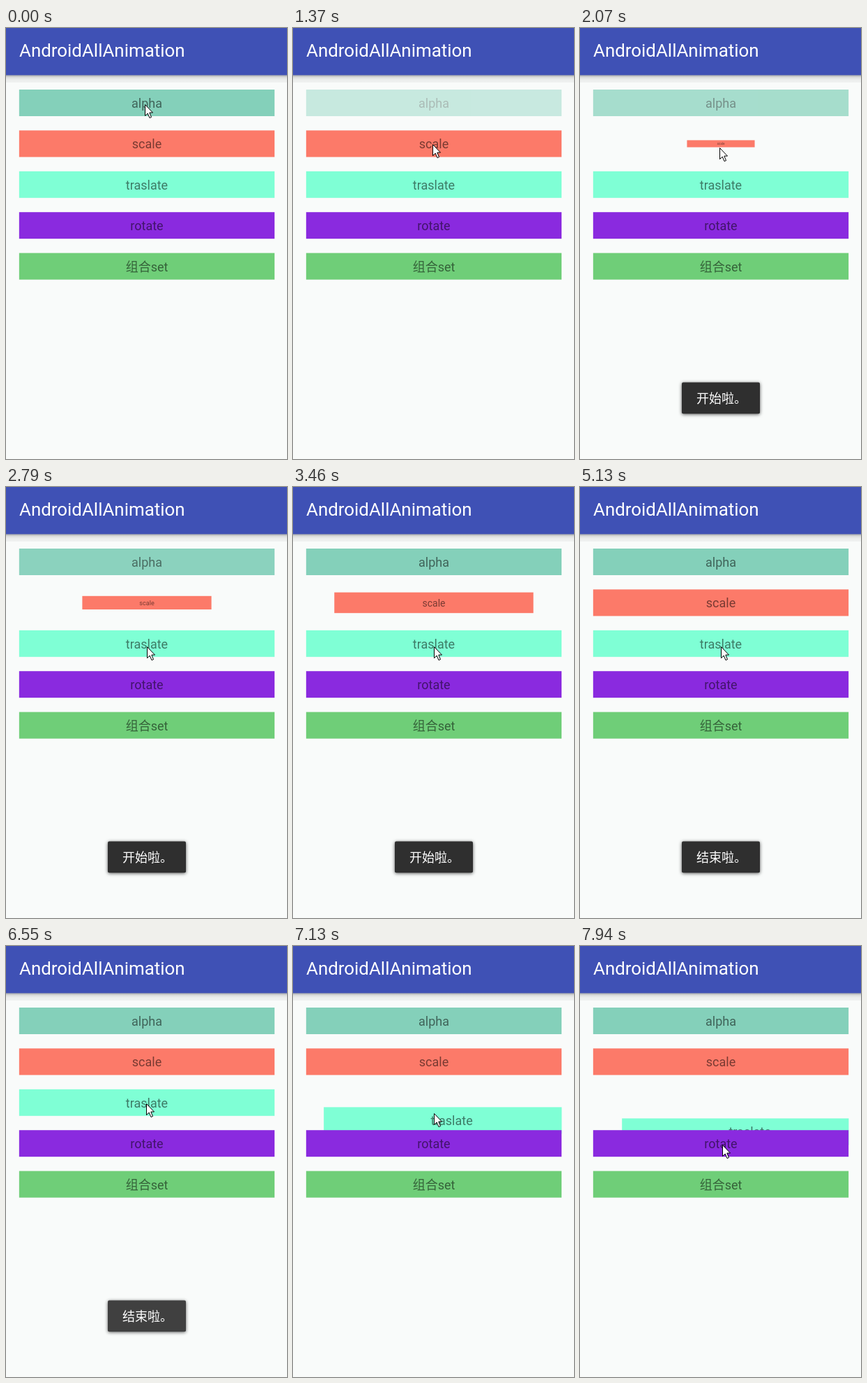
An HTML page that plays this animation: 403 by 616 pixels, repeating every 8 s.

```html
<!DOCTYPE html>
<html lang="zh">
<head>
<meta charset="utf-8">
<style>
  html, body { margin: 0; width: 100%; height: 100%; overflow: hidden; background: #f9fbfa; }
  svg { display: block; font: 18px Roboto, "Noto Sans CJK SC", "Noto Sans CJK", sans-serif; }
  #title { font-size: 25.9px; fill: #fff; }
  .bar text { text-anchor: middle; fill: #000; fill-opacity: .52; }
  #toast rect { fill: #2f2f2f; filter: drop-shadow(0 1.5px 2.5px rgba(0,0,0,.65)); }
  #toast text { text-anchor: middle; fill: #fff; }
</style>
</head>
<body>
<svg width="403" height="616">
  <defs>
    <linearGradient id="shade" x2="0" y2="1">
      <stop stop-opacity=".33"/>
      <stop offset=".25" stop-opacity=".13"/>
      <stop offset=".55" stop-opacity=".06"/>
      <stop offset="1" stop-opacity=".035"/>
    </linearGradient>
    <clipPath id="content"><rect x="18.6" y="88" width="366.8" height="470"/></clipPath>
  </defs>
  <rect width="403" height="67.5" fill="#3f51b5"/>
  <rect y="67.5" width="403" height="10.5" fill="url(#shade)"/>
  <text id="title" x="19" y="41">AndroidAllAnimation</text>
  <g id="list" clip-path="url(#content)"></g>
  <g id="toast">
    <rect x="146" y="506.5" width="112" height="44.7" rx="2"/>
    <text x="203" y="536"></text>
  </g>
  <path id="cursor" d="M-.5 .5V16.5L3.2 13L6 19.5L8.5 18.4L5.8 12H10.5Z" fill="#fff" stroke="#000"/>
</svg>
<script>
const LOOP = 8000, DURATION = 3000, GLIDE = 400, FADE = 500;
const $ = selector => document.querySelector(selector);

const labels = {
  alpha: '#84d0ba', scale: '#fc7a69', traslate: '#7fffd5', rotate: '#8a2adf', '组合set': '#6fce78'
};
$('#list').innerHTML = Object.entries(labels).map(([label, color]) => `
  <g class="bar">
    <rect x="-183.4" y="-19" width="366.8" height="38" fill="${color}"/>
    <text y="7">${label}</text>
  </g>`).join('');
const bars = document.querySelectorAll('.bar');

const clamp = x => Math.min(1, Math.max(0, x));
const mix = (a, b, k) => a + (b - a) * k;
const easeInOut = x => 0.5 - Math.cos(Math.PI * x) / 2;

// Value between from and to while running, rest before the start.
const tween = (t, start, from, to, rest) =>
  t < start ? rest : mix(from, to, easeInOut(clamp((t - start) / DURATION)));

function placeBar(i, shift = 0, scale = 1) {
  const y = 107 + i * 58.4;
  bars[i].setAttribute('transform', `translate(${202 + shift} ${y + shift}) scale(${scale})`);
}

function showToast(t, message, shown, hidden) {
  const enter = clamp((t - shown) / FADE), leave = clamp((t - hidden) / FADE);
  $('#toast text').textContent = message;
  $('#toast').style.opacity = (1 - (1 - enter) ** 2) * (1 - leave ** 2);
}

// The pointer glides to each stop and arrives there at the given time.
const stops = [
  { at: 550, x: 202, y: 187 }, { at: 1370, x: 201, y: 166 }, { at: 2400, x: 203, y: 228 },
  { at: 5710, x: 202, y: 225 }, { at: 7400, x: 205, y: 284 }
];

function pointerAt(t) {
  let x = 200, y = 109;
  for (const stop of stops) {
    const k = easeInOut(clamp((t - stop.at) / GLIDE + 1));
    x = mix(x, stop.x, k);
    y = mix(y, stop.y, k);
  }
  return `translate(${Math.round(x)} ${Math.round(y)})`;
}

bars.forEach((bar, i) => placeBar(i));

function draw(now) {
  const t = now % LOOP;
  bars[0].style.opacity = tween(t, 320, 0.2, 1, 1);
  placeBar(1, 0, tween(t, 1520, 0.2, 1, 1));
  placeBar(2, tween(t, 6600, 22, 69, 0));
  if (t < 4500) showToast(t, '开始啦。', 1600, 3610);
  else showToast(t, '结束啦。', 4600, 6405);
  $('#cursor').setAttribute('transform', pointerAt(t));
  requestAnimationFrame(draw);
}
requestAnimationFrame(draw);
</script>
</body>
</html>
```
